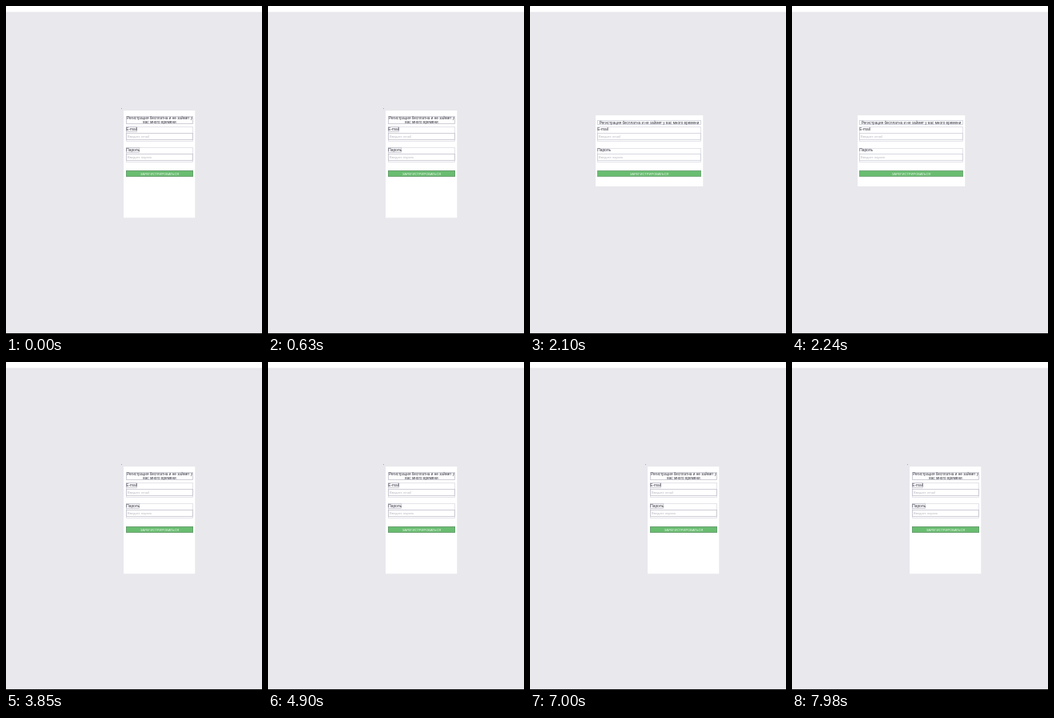
Animation, 320 px wide and 411 px high, one loop 8 s. Source, as an HTML page with a canvas:

```html
<!DOCTYPE html>
<html lang="ru">
<head>
<meta charset="utf-8">
<style>
html, body { margin: 0; width: 100%; height: 100%; overflow: hidden; background: #e8e8ed; }
canvas { display: block; }
</style>
</head>
<body>
<canvas></canvas>
<script>
const W = 320, H = 411, LOOP = 8000;
const canvas = document.querySelector('canvas');
const ratio = window.devicePixelRatio || 1;
canvas.width = W * ratio;
canvas.height = H * ratio;
canvas.style.width = W + 'px';
canvas.style.height = H + 'px';
const ctx = canvas.getContext('2d');
ctx.scale(ratio, ratio);

const narrow = {
  panel: [147, 131, 89.3, 134.3], left: 150, width: 84,
  titleBox: [138, 10], passTop: 177, edge: '#c2c2cc', buttonEdge: '#6a9a72',
  title: [['Регистрация бесплатна и не займет у', 142.2], ['вас много времени', 147]]
};
const wide = {
  panel: [82, 137, 134.3, 89], left: 84, width: 130,
  titleBox: [143, 6], passTop: 178, edge: '#cdd0da', buttonEdge: '#79a780',
  title: [['Регистрация бесплатна и не займет у вас много времени', 147.6]]
};

function fill(color, x, y, w, h) {
  ctx.fillStyle = color;
  ctx.fillRect(x, y, w, h);
}

function box(color, x, y, w, h) {
  ctx.strokeStyle = color;
  ctx.lineWidth = 0.8;
  ctx.strokeRect(x + 0.5, y + 0.5, w - 1, h - 1);
}

function text(str, x, y, size, color, align = 'left') {
  ctx.font = `${size}px "Liberation Sans", Arial, sans-serif`;
  ctx.textAlign = align;
  ctx.fillStyle = color;
  ctx.fillText(str, x, y);
}

function field(form, top, inputTop, label, hint) {
  const { left, width, edge } = form;
  const bottom = inputTop + 11;
  box('#dcdde5', left, top, width, bottom - top);
  if (form === narrow) box(edge, left, top, label === 'E-mail' ? 14 : 17, 7);
  box(edge, left, inputTop, width, 9);
  text(label, left + 0.2, inputTop - 3.2, 4.87, '#333340');
  text(hint, left + 2, inputTop + 6.1, 4.1, '#b8b8c0');
}

function draw(form) {
  fill('#e8e8ed', 0, 0, W, H);
  ctx.fillStyle = '#fff';
  ctx.beginPath();
  ctx.roundRect(0, 0, W, 7.6, [2, 2, 0, 0]);
  ctx.fill();
  fill('#111', 0, 410, W, 1);

  const { left, width } = form, middle = left + width / 2;
  fill('#fff', ...form.panel);
  if (form === narrow) fill('#a8a8b2', 144, 128, 1, 1);
  box(form.edge, left, form.titleBox[0], width, form.titleBox[1]);
  for (const [line, y] of form.title) text(line, middle, y, 4.7, '#333340', 'center');
  field(form, 151, 159, 'E-mail', 'Введите email');
  field(form, form.passTop, 185, 'Пароль', 'Введите пароль');
  fill('#69bd70', left, 206, width, 8);
  box(form.buttonEdge, left, 206, width, 8);
  text('ЗАРЕГИСТРИРОВАТЬСЯ', middle, 211.5, 4.1, '#e9f6ea', 'center');
}

function frame() {
  const t = performance.now() % LOOP;
  draw(t >= 2100 && t < 3850 ? wide : narrow);
  requestAnimationFrame(frame);
}
frame();
</script>
</body>
</html>
```
